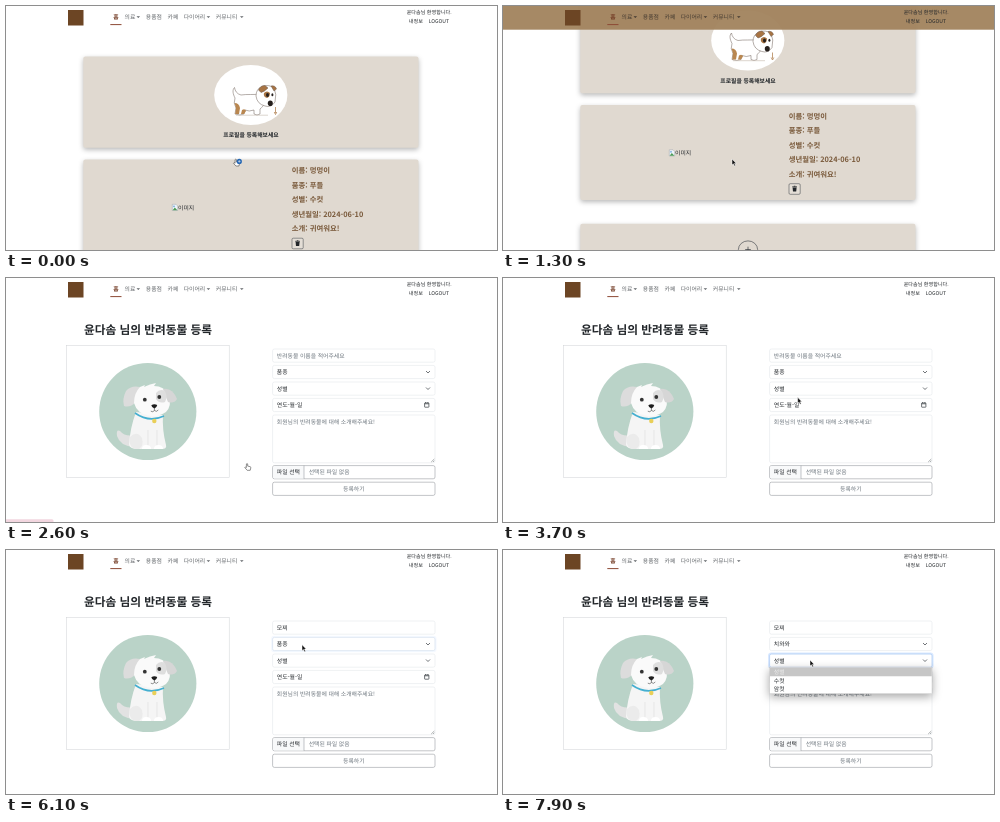
Recreate the animation shown at these times as an HTML page. Size 491 px wide and 244 px high, loop 8 s.

```html
<!DOCTYPE html>
<html lang="ko">
<head>
<meta charset="utf-8">
<title>반려동물 등록</title>
<style>
  html, body { margin: 0; width: 100%; height: 100%; overflow: hidden; background: #fff; }
  svg { display: block; width: 491px; height: 244px; }
  text { font-family: "Noto Sans CJK KR", "Noto Sans KR", "Noto Sans CJK", "Noto Sans", sans-serif; font-size: 5.85px; fill: #212529; white-space: pre; text-rendering: geometricPrecision; }
  .card { fill: #e0d9d0; filter: drop-shadow(0 2.9px 2.9px rgba(0,0,0,.28)); }
  .info text { font-size: 7.35px; font-weight: 700; fill: #79593a; }
  .field { fill: #fff; stroke: #dee2e6; stroke-width: .5; }
  .dark { stroke: #868b90; }
  .hint { fill: #6c757d; }
  .line { fill: none; stroke: #343a40; stroke-width: .7; }
  .user text { font-size: 5.1px; }
  .menu { fill: #fff; stroke: #bbb; stroke-width: .4; filter: drop-shadow(0 3px 5px rgba(0,0,0,.35)); }
  .ring { fill: none; }
</style>
</head>
<body>
<svg viewBox="0 0 491 244" xmlns="http://www.w3.org/2000/svg">
  <g id="home">
    <g id="cards">
      <rect class="card" x="77.3" y="50.5" width="335.2" height="91.3" rx="2"/>
      <ellipse cx="244.8" cy="89" rx="36.6" ry="30" fill="#fff"/>
      <g stroke="#6a5d54" stroke-width=".5" fill="#fff" stroke-linejoin="round">
        <path d="M229 92C227 88 226 84 228.5 81.5C229 85 231 88 235 89C241 88 248 89 254 88L259 96C258 100 256 101 254 103L254 108Q251 110 248 108L248 104Q243 106 239 104L238 108Q234 110 229 108L230 102Q227 97 229 92Z"/>
        <path d="M228.6 97Q233 97 234 102L233 108H229.2L230 102Z" fill="#b98750" stroke="none"/>
        <path d="M236 104Q239 102 240 105L238 108H235Z" fill="#b98750" stroke="none"/>
        <path d="M250 90Q250 83 256 80.5Q263 78 268 82Q271 88 269 96Q265 102 259 100Q251 98 250 90Z"/>
        <path d="M252.5 84Q254 79.5 259 79.5L262 82Q258 86 255 86.5Z" fill="#a87443"/>
        <path d="M265 80Q269 79 270.5 83L268 85Z" fill="#a87443"/>
        <path d="M258 87Q261 84 264 87Q264 91 261 92Q257 91 258 87Z" fill="#a87443" stroke="none"/>
      </g>
      <ellipse cx="264.3" cy="97.3" rx="2.5" ry="2.8" fill="#251f1d"/>
      <ellipse cx="261.5" cy="89" rx="1.5" ry="1.9" fill="#251f1d"/>
      <ellipse cx="266.4" cy="88.8" rx="1" ry="1.5" fill="#251f1d"/>
      <path d="M269.5 101V107M268.2 106L269.5 108.5L270.8 106" fill="none" stroke="#a9743f" stroke-width=".7"/>
      <path d="M230 109.2H262" stroke="#c4b9ad" stroke-width=".6"/>
      <text x="245" y="131" text-anchor="middle" font-weight="700">프로필을 등록해보세요</text>

      <rect class="card" x="77.3" y="153.5" width="335.2" height="95" rx="2"/>
      <path d="M166.3 198.3H170L171.7 200V204.5H166.3Z" fill="#eef4fa" stroke="#8c9299" stroke-width=".4"/>
      <path d="M166.6 204.3L168.8 201.5L171.4 204.3Z" fill="#4c9c54"/>
      <circle cx="168" cy="200.3" r=".9" fill="#75a8dc"/>
      <text x="172" y="203.6">이미지</text>
      <g id="info" class="info"></g>
      <rect x="286" y="232.2" width="11.2" height="10.6" rx="1.2" fill="#e4ded6" stroke="#343a40" stroke-width=".5"/>
      <path d="M289.2 235.3H294M290.8 234.7H292.4" stroke="#212529" stroke-width=".8"/>
      <path d="M289.6 236H293.6L293.2 240H290Z" fill="#212529"/>

      <rect class="card" x="77.3" y="272.2" width="335.2" height="52" rx="2"/>
      <ellipse cx="245" cy="298" rx="9.6" ry="8.6" class="line" style="stroke-width:.6"/>
      <path d="M242.2 298H247.8M245 295.2V300.8" class="line"/>
    </g>
    <rect id="bar" width="491" height="23.7" fill="#a2845f" opacity="0"/>
  </g>

  <g id="register">
    <text x="142" y="56.3" text-anchor="middle" font-weight="700" style="font-size:11.7px">윤다솜 님의 반려동물 등록</text>
    <rect class="field" x="60.5" y="67.7" width="162.7" height="131.6" style="stroke:#cfd2d5"/>
    <circle cx="141.8" cy="133.5" r="48.6" fill="#bad3c8"/>
    <g id="puppy">
      <path d="M128 169Q114 168 111 158Q110 151 114 153Q119 159 129 157Z" fill="#e2e2e2"/>
      <path d="M130 134Q124 150 123 167Q124 171 132 171H156Q161 171 160 167Q156 151 157 137Z" fill="#f5f5f5"/>
      <path d="M124 159Q131 152 136 160Q138 168 133 171Q122 172 124 159Z" fill="#ebebeb"/>
      <path d="M142 152V170M151 152V170" stroke="#dcdcdc" stroke-width=".6"/>
      <path d="M136 171Q136 166.5 140.5 167Q145 167 145 171ZM148 171Q148 167 152.5 167Q157 167 157 171Z" fill="#fff"/>
      <path d="M134 109Q125 107 120 113Q116 121 118 128Q124 130 130 124Z" fill="#dcdcdc"/>
      <path d="M128 125Q128 115 134 109L139 107L138 109Q144 106 150 105L148 108Q158 108 163 117Q166 128 160 134Q153 139 144 138Q131 136 128 125Z" fill="#fafafa"/>
      <path d="M157 111Q166 109 171 121Q168 126 162 124Q159 117 157 111Z" fill="#d6d6d6"/>
      <path d="M150 115Q154 110 159 113Q162 119 159 124Q153 126 150 121Z" fill="#dedede"/>
      <circle cx="138.8" cy="121.7" r="1.9" fill="#343434"/>
      <circle cx="153.3" cy="119" r="1.9" fill="#343434"/>
      <path d="M145.3 127.2Q148.3 125.5 151.2 127Q150.7 130 148.4 130.5Q146 130 145.3 127.2Z" fill="#1d1d1d"/>
      <path d="M148.4 130V132.5M144.8 133.2Q147 134.6 148.4 132.5Q150.5 134.4 152.3 132" fill="none" stroke="#444" stroke-width=".6"/>
      <path d="M129 135Q143 145 158 138" fill="none" stroke="#44afd0" stroke-width="1.6"/>
      <circle cx="148.3" cy="143" r="2.2" fill="#e9cf58"/>
    </g>
    <g id="form"></g>
    <rect id="caret" y="74.2" width=".5" height="6.6" fill="#222"/>
    <path id="compose" stroke="#333" stroke-width=".5"/>
    <g id="rings"></g>
    <g id="menu"></g>
  </g>

  <g id="nav"></g>
  <rect id="status" x="-2" y="241.3" width="49.5" height="6" rx="1.5" fill="#f2d6df"/>
  <g id="cursor">
    <path id="arrow" d="M0 0V6L1.4 4.8L2.4 7L3.5 6.5L2.5 4.4H4.2Z" fill="#111" stroke="#fff" stroke-width=".5"/>
    <path id="hand" d="M.1 .6Q.8-.3 1.4 .6V2.8L4 3.4Q4.7 3.7 4.5 4.6L3.9 7H.9L-1.5 4.3Q-1.2 3.4-.4 3.9L.1 4.2Z" fill="#fff" stroke="#222" stroke-width=".5"/>
    <path id="beam" d="M-1-3H1M0-3V3M-1 3H1" stroke="#222" stroke-width=".6"/>
    <g id="badge"><circle cx="4.3" cy="2.4" r="2.6" fill="#2768b4"/><path d="M3 2.4H5.6M4.3 1.1V3.7" stroke="#fff" stroke-width=".5"/></g>
  </g>
</svg>
<script>
const $ = id => document.getElementById(id);
const show = (id, on) => $(id).setAttribute('visibility', on ? 'visible' : 'hidden');
const label = (x, y, s, attrs = '') => `<text x="${x}" y="${y}" ${attrs}>${s}</text>`;
const box = (y, h, cls = '') => `<rect class="field ${cls}" x="266.6" y="${y}" width="162.4" height="${h}" rx="1.8"/>`;
const chevron = y => `<path class="line" d="M420 ${y - 1}L422 ${y + 1}L424 ${y - 1}"/>`;

// Piecewise linear lookup: rows are [time, ...values].
function track(rows, t) {
  if (t <= rows[0][0]) return rows[0].slice(1);
  for (let i = 1; i < rows.length; i++) {
    const [a, b] = [rows[i - 1], rows[i]];
    if (t <= b[0]) {
      const k = (t - a[0]) / (b[0] - a[0]);
      return a.slice(1).map((v, j) => v + (b[j + 1] - v) * k);
    }
  }
  return rows[rows.length - 1].slice(1);
}
// Latest value whose time has passed.
const latest = (rows, t) => rows.reduce((v, r) => t >= r[0] ? r[1] : v, '');

const LOOP = 8000, STEP = 100;
const OPEN_PAGE = 2500, FOCUS = 4000, HIDE = 4600, UNHIDE = 5600;
const OPEN_BREED = 6200, PICK = 7300, OPEN_SEX = 7800;
const ROW = 8.66;
const scroll = [[600, 0], [900, 17], [1300, 54.5], [1800, 108]];
const pointer = [
  [0, 229, 153], [1800, 229, 153], [2200, 240.3, 185.3], [2800, 240.3, 185.3],
  [3600, 292, 140], [3900, 300, 78], [5700, 300, 78], [6000, 296, 94],
  [6300, 296, 96], [7000, 295, 141.5], [7300, 295, 141.5], [7700, 307, 110]
];
const typing = [[4700, 'ㅁ'], [4900, '모'], [5200, '모ㅉ'], [5400, '모찌']];
const breeds = ['품종', '푸들', '비글', '말티즈', '치와와', '불도그', '보더콜리', '닥스훈트', '저먼 셰퍼드', '골든 리트리버', '시베리안 허스키'];
const sexes = ['성별', '수컷', '암컷'];

$('info').innerHTML = ['이름: 멍멍이', '품종: 푸들', '성별: 수컷', '생년월일: 2024-06-10', '소개: 귀여워요!']
  .map((s, i) => label(285.7, 167.3 + i * 14.45, s)).join('');

$('nav').innerHTML =
  '<rect x="62" y="4" width="15.5" height="15.5" fill="#6c4524"/>' +
  label(107.3, 13.2, '홈', 'font-weight="700" style="fill:#733c25"') +
  '<path d="M104.3 18.6H115.5" stroke="#8d4934" stroke-width="1"/>' +
  '<g id="links">' +
  [[118.5, '의료'], [139.8, '용품점'], [161.6, '카페'], [177.7, '다이어리'], [209.8, '커뮤니티']]
    .map(([x, s]) => label(x, 13.2, s, 'style="fill:inherit"')).join('') +
  [130.5, 200.6, 234].map(x => `<path d="M${x} 10.2h3.6l-1.8 1.9z"/>`).join('') + '</g>' +
  '<g class="user">' + label(400.7, 7.7, '윤다솜님 환영합니다.') + label(402.8, 17, '내정보') + label(422.7, 17, 'LOGOUT') + '</g>';

$('form').innerHTML =
  box(71, 13.2) + label(270.8, 79.8, '', 'id="name"') +
  box(87.4, 13.2) + label(270.8, 96.2, '', 'id="breed"') + chevron(94) +
  box(104, 13.2) + label(270.8, 112.7, '성별') + chevron(110.5) +
  box(120.4, 13.2) + label(270.8, 129.2, '연도-월-일') +
  '<rect class="line" x="418.6" y="125" width="4.3" height="4.2" rx=".4"/><path class="line" d="M418.6 125.8H422.9M419.6 124V125M421.9 124V125"/>' +
  box(137, 47.8) + label(270.8, 145.7, '회원님의 반려동물에 대해 소개해주세요!', 'class="hint"') +
  '<path class="line" style="stroke-width:.4" d="M425.2 184L428.3 181M427 184L428.3 182.7"/>' +
  box(187.6, 13.2, 'dark') +
  '<path d="M268.4 187.9H298V200.5H268.4Q267 200.5 267 198.7V189.7Q267 187.9 268.4 187.9Z" fill="#f8f9fa"/><path d="M298 187.6V200.8" stroke="#868b90" stroke-width=".5"/>' +
  label(270.8, 196.4, '파일 선택', 'font-weight="500"') + label(302.7, 196.4, '선택된 파일 없음', 'class="hint"') +
  box(204.2, 13.2, 'dark') + label(347.8, 213, '등록하기', 'class="hint" text-anchor="middle"');

$('rings').innerHTML = [71, 87.4, 104].map(y =>
  `<g><rect class="ring" x="265.9" y="${y - .7}" width="163.8" height="14.6" rx="2.4" stroke="#0d6efd" stroke-opacity=".22" stroke-width="1.7"/>` +
  `<rect class="ring" x="266.6" y="${y}" width="162.4" height="13.2" rx="1.8" stroke="#8fbcfe" stroke-width=".5"/></g>`).join('');
const rings = [...$('rings').children];

function menu(items, top, active) {
  const rows = items.map((s, i) => {
    const y = top + i * ROW, on = i === active;
    const fill = on ? '#fff' : i ? '#212529' : '#8d8d8d';
    const back = on ? `<rect x="266.8" y="${y}" width="162" height="${ROW}" fill="${i ? '#1163cf' : '#c6c6c6'}"/>` : '';
    return back + label(270.8, y + 6.5, s, `style="fill:${on && !i ? '#ececec' : fill}"`);
  });
  return `<rect class="menu" x="266.6" y="${top - .2}" width="162.4" height="${items.length * ROW + .4}"/>` + rows.join('');
}

function drawHome(t) {
  const [y] = track(scroll, t);
  const [bar] = track([[600, 0], [900, .955]], t);
  $('cards').setAttribute('transform', `translate(0 ${-y})`);
  $('bar').setAttribute('opacity', bar);
  $('links').setAttribute('fill', t < OPEN_PAGE && bar > .5 ? '#443a30' : '#62666a');
}

function drawForm(t, y) {
  const typed = latest(typing, t), name = $('name');
  name.textContent = typed || '반려동물 이름을 적어주세요';
  name.setAttribute('class', typed ? '' : 'hint');
  $('breed').textContent = t < PICK ? '품종' : '치와와';

  const end = 270.8 + typed.length * 5.38;
  $('caret').setAttribute('x', end + .2);
  $('compose').setAttribute('d', `M${end - 5.2} 81.2H${end}`);
  const editing = t >= FOCUS && t < OPEN_BREED - 100;
  show('caret', editing);
  show('compose', editing && typed && t < UNHIDE);

  const spans = [[FOCUS, OPEN_BREED - 100], [OPEN_BREED - 100, OPEN_SEX], [OPEN_SEX, LOOP]];
  spans.forEach(([a, b], i) => {
    const on = t >= a && t < b;
    rings[i].setAttribute('opacity', on ? Math.min(1, .2 + (t - a) / 200) : 0);
  });

  let list = '';
  if (t >= OPEN_BREED && t < PICK) list = menu(breeds, 101, Math.max(0, Math.floor((y - 101) / ROW)));
  if (t >= OPEN_SEX) list = menu(sexes, 117.6, 0);
  $('menu').innerHTML = list;
}

function draw(t) {
  const form = t >= OPEN_PAGE, [x, y] = track(pointer, t);
  $('home').style.display = form ? 'none' : '';
  $('register').style.display = form ? '' : 'none';
  drawHome(t);
  if (form) drawForm(t, y);

  const busy = t < 300;
  const hand = busy || (t >= 2100 && t < 2800);
  const beam = t >= 3900 && t < 5800;
  $('cursor').setAttribute('transform', `translate(${x} ${y})`);
  $('cursor').style.display = t >= HIDE && t < UNHIDE ? 'none' : '';
  show('hand', hand);
  show('beam', beam);
  show('arrow', !hand && !beam);
  show('badge', busy);
  show('status', t >= 2200 && t < 2800);
}

const start = performance.now();
function tick() {
  const t = (performance.now() - start) % LOOP;
  draw(Math.floor(t / STEP) * STEP);
  requestAnimationFrame(tick);
}
tick();
</script>
</body>
</html>
```
